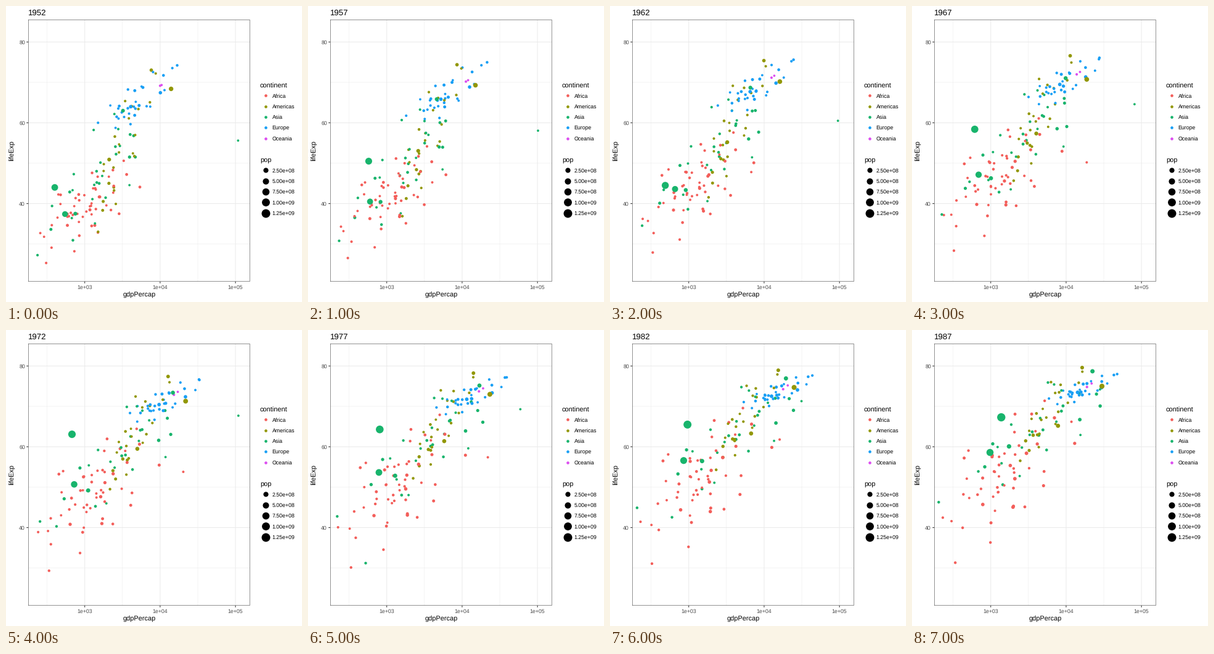
Animation of 480x480 px, one loop 8 s. Source, as a matplotlib script:

```python
import numpy as np
import matplotlib.pyplot as plt
from matplotlib.animation import FuncAnimation
from matplotlib.patches import Rectangle

plt.rcParams["font.family"] = "Liberation Sans"
plt.rcParams["text.hinting"] = "none"

SIZE, DPI = 480, 96
PT = 72 / DPI  # points per pixel
LEFT, TOP, RIGHT, BOTTOM = 36, 22, 395.5, 447
STEPS = 8      # one step is five years, beginning in 1952
STEP = np.arange(STEPS)
T = STEP / (STEPS - 1)
EASE = 1 - (1 - T) ** 1.3

COLORS = {"Africa": "#F35E5A", "Americas": "#929705", "Asia": "#18B46C",
          "Europe": "#189FF5", "Oceania": "#DC4DF0"}
GROWTH = {"Africa": .026, "Americas": .012, "Asia": .0175,
          "Europe": .006, "Oceania": .015}

rng = np.random.default_rng(7)
tracks = []  # (color, log income, life, population), each over all steps


def add_track(group, millions, log_income, life):
    people = millions * (1 + GROWTH[group]) ** (5 * (STEP - 4))
    tracks.append((COLORS[group], log_income, life, people))


def shift(start, end):
    return start + (end - start) * EASE


def scores(count):
    """Random scores with mean 0 and deviation 1, without far outliers."""
    z = np.clip(rng.normal(size=count), -2, 2)
    return (z - z.mean()) / z.std()


def cloud(group, count, income, income_dev, life, life_dev, link):
    """Dots around a moving centre; link ties life to income."""
    top = 75 + 5 * T
    rich, fit = scores(count), scores(count)
    for r, f in zip(rich, fit):
        wander = rng.normal(0, .07, (2, STEPS)).cumsum(axis=1)
        u, v = r + wander[0], f + wander[1]
        x = shift(*income) + shift(*income_dev) * u
        y = shift(*life) + shift(*life_dev) * (link * u + np.sqrt(1 - link ** 2) * v)
        y = top - 1.5 * np.log1p(np.exp((top - y) / 1.5))  # soft ceiling
        add_track(group, min(10 ** rng.normal(.8, .5), 60), x, y)


def leader(group, millions, *keys):
    """A conspicuous dot, led through (step, income, life) points."""
    at, income, life = np.array(keys, float).T
    add_track(group, millions, np.interp(STEP, at, np.log10(income)),
              np.interp(STEP, at, life))


cloud("Africa", 51, (3, 3.16), (.29, .36), (39, 53.2), (4.8, 7.6), .5)
cloud("Asia", 27, (3.18, 3.65), (.33, .48), (46.6, 64.5), (8.5, 7), .72)
cloud("Americas", 23, (3.5, 3.77), (.22, .22), (53.3, 68.3), (8.5, 5), .6)
cloud("Europe", 30, (3.68, 4.2), (.25, .22), (65.3, 74.1), (4.8, 2.1), .85)
cloud("Oceania", 2, (4.01, 4.31), (.01, .03), (69.3, 75.3), (.2, 1), .9)
rng.shuffle(tracks)

leader("Asia", 862, (0, 400, 44), (1, 576, 50.5), (2, 488, 44.5),
       (3, 613, 58.4), (4, 677, 63.1), (6, 962, 65.5), (7, 1379, 67.3))
leader("Asia", 567, (0, 547, 37.4), (2, 658, 43.6), (4, 724, 50.7),
       (6, 856, 56.6), (7, 977, 58.6))
leader("Asia", 121, (0, 750, 37.5), (4, 1111, 49.2), (7, 1748, 60.1))
leader("Asia", 107, (0, 3217, 63), (2, 6577, 68.7), (4, 14779, 73.4), (7, 22376, 78.7))
leader("Asia", .8, (0, 108382, 55.6), (2, 95458, 60.5), (3, 80895, 64.6),
       (4, 109348, 67.7), (5, 59265, 69.3), (6, 31354, 71.3), (7, 28118, 74.2))
leader("Asia", 7.5, (0, 368, 39.4), (3, 523, 45.4), (4, 422, 40.3),
       (5, 525, 31.2), (7, 684, 53.9))
leader("Africa", 2.2, (0, 2388, 42.7), (2, 6757, 47.8), (3, 18773, 50.2),
       (5, 21951, 57.4), (7, 11770, 66.2))
leader("Americas", 101, (0, 2109, 50.9), (4, 4986, 59.5), (7, 7807, 65.2))
leader("Americas", 210, (0, 13990, 68.4), (2, 16173, 70.2), (4, 21806, 71.3),
       (6, 25010, 74.7), (7, 29884, 75))


def to_x(log_income):
    return 127.7 + 122.2 * (log_income - 3)


def to_y(life):
    return 58.4 + 6.55 * (80 - life)


def dot_area(size):
    """Marker area for a point size in millimetres."""
    diameter = .75 * (2.845 * size + .945) + .71
    return (diameter * PT) ** 2


def pop_size(millions):
    return 1 + 5 * np.sqrt(millions / 1318.7)


fig = plt.figure(figsize=(SIZE / DPI, SIZE / DPI), dpi=DPI, facecolor="white")
ax = fig.add_axes([0, 0, 1, 1])
ax.set(xlim=(0, SIZE), ylim=(SIZE, 0))
ax.axis("off")


def line(xs, ys, color, width):
    ax.plot(xs, ys, color=color, lw=width * PT, zorder=1, snap=False,
            solid_capstyle="butt")


def label(x, y, text, size=8.8, color="black", **kw):
    kw.setdefault("va", "baseline")
    return ax.text(x, y, text, fontsize=size * PT, color=color, **kw)


def grid_x(power, width):
    line([to_x(power)] * 2, [TOP, BOTTOM], "#EBEBEB", width)


def grid_y(life, width):
    line([LEFT, RIGHT], [to_y(life)] * 2, "#EBEBEB", width)


for p in (2.5, 3.5, 4.5):
    grid_x(p, .53)
for v in (30, 50, 70):
    grid_y(v, .53)
for p in (3, 4, 5):
    grid_x(p, 1.07)
    line([to_x(p)] * 2, [BOTTOM, BOTTOM + 2.75], "#333333", 1.07)
    label(to_x(p), 459, f"1e+0{p}", color="#4D4D4D", ha="center")
for v in (40, 60, 80):
    grid_y(v, 1.07)
    line([LEFT - 2.75, LEFT], [to_y(v)] * 2, "#333333", 1.07)
    label(31, to_y(v) + 3.2, str(v), color="#4D4D4D", ha="right")

# Only the inner half of the border shows.
ax.add_patch(Rectangle((LEFT + .27, TOP + .27), RIGHT - LEFT - .53,
                       BOTTOM - TOP - .53, fill=False, ec="#333333",
                       lw=.53 * PT, zorder=4, snap=False))
label((LEFT + RIGHT) / 2, 472, "gdpPercap", 11, ha="center")
label(15.2, 234.5, "lifeExp", 11, rotation=90, ha="right", va="center")
title = label(36, 15.2, "1952", 13.2)


def legend(name, y, entries):
    label(412, y, name, 11)
    for i, (text, color, size) in enumerate(entries):
        cy = y + 12.4 + 17.28 * i
        ax.scatter([420.7], [cy], s=dot_area(size), c=color, linewidths=0, snap=False)
        label(431.7, cy + 3.3, text)


legend("continent", 133, [(n, c, 1.5) for n, c in COLORS.items()])
legend("pop", 254, [(f"{m / 1000:.2f}e+09" if m >= 1000 else f"{m / 100:.2f}e+08",
                     "black", pop_size(m)) for m in range(250, 1251, 250)])

income, life, people = (np.array([t[k] for t in tracks]) for k in (1, 2, 3))
xs, ys = to_x(income), to_y(life)
areas = dot_area(pop_size(people))
dots = ax.scatter(xs[:, 0], ys[:, 0], s=areas[:, 0], c=[t[0] for t in tracks],
                  linewidths=0, zorder=3, snap=False)


def update(step):
    title.set_text(str(1952 + 5 * step))
    dots.set_offsets(np.column_stack([xs[:, step], ys[:, step]]))
    dots.set_sizes(areas[:, step])
    return title, dots


anim = FuncAnimation(fig, update, frames=STEPS, interval=1000, repeat=True,
                     repeat_delay=0, blit=False)
plt.show()
```
